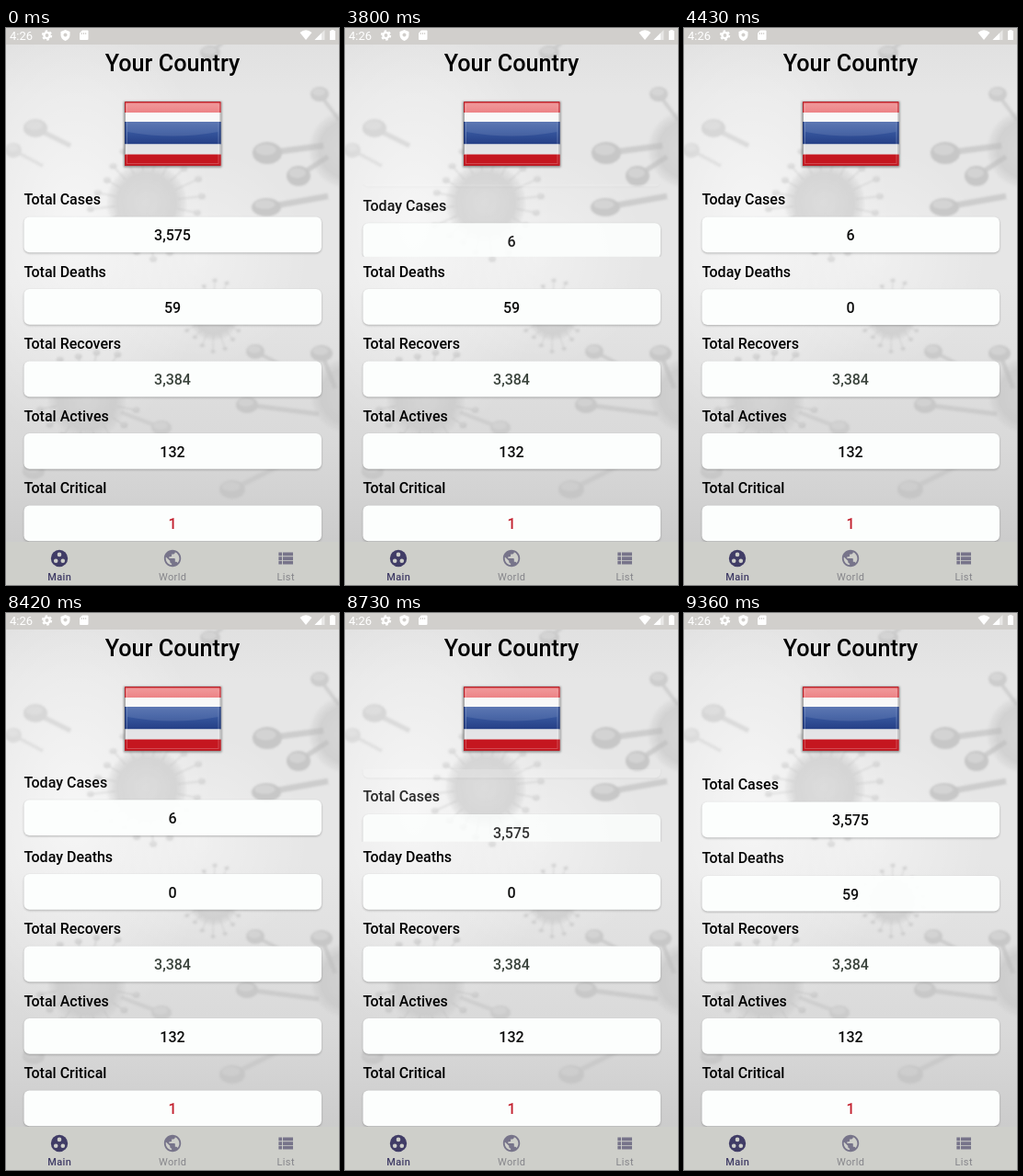
These frames come from a looping animation (362x606 px, 9.44 s). An HTML page:

```html
<!DOCTYPE html>
<html lang="en">
<head>
<meta charset="utf-8">
<title>Your Country</title>
<style>
  html, body { margin: 0; width: 100%; height: 100%; overflow: hidden; background: #ddd; }
  svg { display: block; width: 362px; height: 606px; font-family: Roboto, sans-serif; }
  .title { font-size: 25.2px; font-weight: 500; }
  .card text { font-size: 16px; font-weight: 500; }
  .mid { text-anchor: middle; }
  nav, .tab { font-size: 11px; letter-spacing: .4px; }
</style>
</head>
<body>
<svg viewBox="0 0 362 606">
  <defs>
    <linearGradient id="paper" x1="0" y1="0" x2="0" y2="1">
      <stop offset="0" stop-color="#dfdfdf"/>
      <stop offset=".12" stop-color="#e6e6e6"/>
      <stop offset=".45" stop-color="#e6e6e6"/>
      <stop offset=".75" stop-color="#d9d9d9"/>
      <stop offset="1" stop-color="#c6c6c6"/>
    </linearGradient>
    <radialGradient id="glow">
      <stop offset="0" stop-color="#fff" stop-opacity=".65"/>
      <stop offset="1" stop-color="#fff" stop-opacity="0"/>
    </radialGradient>
    <radialGradient id="cell">
      <stop offset="0" stop-color="#c9c9c9" stop-opacity=".5"/>
      <stop offset=".75" stop-color="#bdbdbd" stop-opacity=".5"/>
      <stop offset="1" stop-color="#c4c4c4" stop-opacity=".15"/>
    </radialGradient>
    <linearGradient id="flagRed" x1="0" y1="0" x2="0" y2="1">
      <stop offset="0" stop-color="#d8474c"/>
      <stop offset=".3" stop-color="#ee8a8c"/>
      <stop offset="1" stop-color="#ea7478"/>
    </linearGradient>
    <linearGradient id="flagBlue" x1="0" y1="0" x2="0" y2="1">
      <stop offset="0" stop-color="#4a68aa"/>
      <stop offset=".45" stop-color="#36569d"/>
      <stop offset="1" stop-color="#253f86"/>
    </linearGradient>
    <filter id="soft" x="-20%" y="-20%" width="140%" height="140%"><feGaussianBlur stdDeviation="1.3"/></filter>
    <filter id="shade" x="-10%" y="-20%" width="120%" height="150%"><feGaussianBlur stdDeviation="1"/></filter>
    <clipPath id="row0"><rect y="170" width="362" height="78.7"/></clipPath>
    <clipPath id="row1"><rect y="248.5" width="362" height="78.7"/></clipPath>
  </defs>

  <rect width="362" height="606" fill="url(#paper)"/>
  <ellipse cx="75" cy="215" rx="150" ry="240" fill="url(#glow)"/>
  <ellipse cx="210" cy="250" rx="120" ry="120" fill="url(#glow)" opacity=".6"/>
  <g id="germs" filter="url(#soft)"></g>

  <rect width="362" height="18" fill="#d1cfcc"/>
  <g fill="#fff">
    <text x="4" y="12.6" font-size="13">4:26</text>
    <circle cx="44.5" cy="8" r="3.1" fill="none" stroke="#fff" stroke-width="2.4"/>
    <circle cx="44.5" cy="8" r="4.8" fill="none" stroke="#fff" stroke-width="1.8" stroke-dasharray="2.5 2.527"/>
    <path d="M64.5 2l5 2.1v3.4c0 3-2 5.500-5 6.500c-3-1-5-3.500-5-6.500V4.100z"/>
    <circle cx="64.500" cy="7.500" r="2" fill="#d1cfcc"/>
    <path d="M83 2.500h5.500q1 0 1 1v8.500q0 1-1 1h-7.500q-1 0-1-1V5.500z"/>
    <path d="M82.300 5v2M84.500 5v2M86.700 5v2" stroke="#d1cfcc"/>
    <path d="M319.500 5q6.500-5.500 13 0l-6.500 8z"/>
    <path d="M346.500 2v11h-11z" opacity=".5"/>
    <path d="M343 5.500v7.500h-7.500z"/>
    <path d="M353.500 2h3v1h1.500v10h-6V3h1.500z"/>
  </g>

  <text class="title mid" x="181" y="47">Your Country</text>

  <rect x="128" y="80" width="106.500" height="71.500" fill="#444" opacity=".55" filter="url(#shade)"/>
  <g id="flag">
    <rect x="129" y="80" width="104.500" height="70" fill="#f7f7f7"/>
    <rect x="129" y="80" width="104.500" height="12" fill="url(#flagRed)"/>
    <rect x="129" y="102" width="104.500" height="24.500" fill="url(#flagBlue)"/>
    <rect x="129" y="126.500" width="104.500" height="11" fill="#e4e4e6"/>
    <rect x="129" y="137.500" width="104.500" height="12.500" fill="#c5161f"/>
    <path d="M132 113q49 9 98.500 0V83H132z" fill="#fff" opacity=".1"/>
    <rect x="131.500" y="82.500" width="99.500" height="65" fill="none" stroke="#fff" opacity=".22"/>
    <path d="M129.500 92V80.500H233V92M129.500 137.500V149.500H233V137.500" fill="none" stroke="#b5222a"/>
    <path d="M129.500 102v24.500M233 102v24.500" stroke="#22366f"/>
    <path d="M129.500 92v10M233 92v10M129.500 126.500v11M233 126.500v11" stroke="#aaa"/>
  </g>

  <g id="cards"></g>

  <rect y="559" width="362" height="47" fill="#cecfca"/>
  <g class="tab mid" fill="#403c66">
    <circle cx="58" cy="577" r="9.200"/>
    <g fill="#cecfca">
      <circle cx="58" cy="572.900" r="2.300"/><circle cx="54.200" cy="579.700" r="2.300"/><circle cx="61.800" cy="579.700" r="2.300"/>
    </g>
    <text x="58.200" y="601" font-weight="500">Main</text>
  </g>
  <g class="tab mid" fill="#77748a">
    <path transform="translate(170 566) scale(.92)" d="M12 2C6.480 2 2 6.480 2 12s4.480 10 10 10 10-4.480 10-10S17.520 2 12 2zm-1 17.930c-3.950-.490-7-3.850-7-7.930 0-.620.080-1.210.210-1.790L9 15v1c0 1.100.900 2 2 2zm6.900-2.540c-.260-.810-1-1.390-1.900-1.390h-1v-3c0-.550-.450-1-1-1H8v-2h2c.550 0 1-.450 1-1V7h2c1.100 0 2-.900 2-2v-.410c2.930 1.190 5 4.060 5 7.410 0 2.080-.800 3.970-2.100 5.390z"/>
    <path transform="translate(292.700 566) scale(.92)" d="M4 14h4v-4H4zm0 5h4v-4H4zM4 9h4V5H4zm5 5h12v-4H9zm0 5h12v-4H9zM9 5v4h12V5z"/>
    <g fill="#85858a"><text x="181.200" y="601">World</text><text x="304.200" y="601">List</text></g>
  </g>
</svg>

<script>
const LOOP = 9440, PITCH = 78.5, TOP = 170, SLIDE = 500;
// Starts of runs of 80 ms ticks; the picture holds between ticks.
const TICK = 80, RUNS = [-40, 4190, 8420, 8570, 9120];
const $ = id => document.getElementById(id);

function add(parent, tag, attrs = {}, text = '') {
  const el = document.createElementNS('http://www.w3.org/2000/svg', tag);
  for (const key in attrs) el.setAttribute(key, attrs[key]);
  el.textContent = text;
  return parent.appendChild(el);
}

function knob(x, y, rx, ry, toX, toY, alpha = .6) {
  const g = add($('germs'), 'g', { opacity: alpha });
  add(g, 'path', { d: `M${x} ${y}L${toX} ${toY}`, stroke: '#bcbcbc', 'stroke-width': rx * .4 });
  add(g, 'ellipse', { cx: x, cy: y, rx, ry, fill: '#b3b3b3' });
  add(g, 'ellipse', { cx: x - rx * .1, cy: y - ry * .3, rx: rx * .7, ry: ry * .5, fill: '#c6c6c6' });
}

function germ(x, y, r, spikes, alpha) {
  add($('germs'), 'circle', { cx: x, cy: y, r, fill: 'url(#cell)' });
  for (let i = 0; i < spikes; i++) {
    const a = i * 2 * Math.PI / spikes + .2, reach = r * (1.3 + .15 * Math.sin(i * 5));
    const size = r * .09;
    knob(x + reach * Math.cos(a), y + reach * Math.sin(a), size, size * .8,
      x + r * .8 * Math.cos(a), y + r * .8 * Math.sin(a), alpha);
  }
}

germ(153, 190, 43, 20, .4);
germ(226, 313, 27, 18, .5);
germ(88, 405, 42, 16, .5);
germ(372, 132, 42, 0, 0);
germ(372, 400, 40, 0, 0);
knob(284, 136, 16, 12, 345, 128);
knob(318, 161, 13, 11, 350, 140);
knob(283, 195, 16, 10, 350, 183);
knob(222, 27, 11, 8, 252, 2, .5);
knob(341, 72, 10, 8, 362, 100, .5);
knob(32, 109, 13, 10, 70, 128, .4);
knob(8, 133, 9, 8, 40, 150, .3);
knob(271, 352, 10, 8, 310, 372, .5);
knob(343, 354, 12, 9, 358, 392, .55);
knob(262, 410, 12, 9, 340, 420, .5);
knob(169, 435, 11, 8, 125, 418, .4);
knob(30, 482, 12, 9, 62, 440, .4);
knob(246, 502, 14, 10, 310, 470, .4);

function card(parent, row, label, value, color = '#0b0b0b') {
  const g = add(parent, 'g', { class: 'card' }), y = TOP + row * PITCH;
  const box = { x: 19.5, y: y + 35.5, width: 323.5, height: 38.7, rx: 6 };
  add(g, 'text', { x: 19.4, y: y + 22 }, label);
  add(g, 'rect', { ...box, y: box.y + 1, fill: '#555', opacity: .4, filter: 'url(#shade)' });
  add(g, 'rect', { ...box, fill: '#fcfefd' });
  add(g, 'text', { x: 181, y: y + 61.2, class: 'mid', fill: color }, value);
  return g;
}

function slidingRow(row, label, total, today, starts) {
  const g = add($('cards'), 'g', { 'clip-path': `url(#row${row})` });
  return { starts, faces: [card(g, row, 'Total ' + label, total), card(g, row, 'Today ' + label, today)] };
}

const rows = [
  slidingRow(0, 'Cases', '3,575', '6', [3395, 8366]),
  slidingRow(1, 'Deaths', '59', '0', [3952, 8910]),
];
card($('cards'), 2, 'Total Recovers', '3,384', '#3b443d');
card($('cards'), 3, 'Total Actives', '132');
card($('cards'), 4, 'Total Critical', '1', '#c3202e');

function ease(x) {
  return (1 - Math.cos(Math.PI * Math.min(1, Math.max(0, x)))) / 2;
}

function place(face, offset) {
  face.setAttribute('transform', `translate(0 ${(offset * PITCH).toFixed(2)})`);
  face.setAttribute('opacity', Math.max(0, 1 - Math.abs(offset)).toFixed(3));
}

function draw(time) {
  const run = RUNS.filter(start => start <= time).pop();
  const t = run + TICK * Math.floor((time - run) / TICK);
  for (const { starts, faces: [total, today] } of rows) {
    const [there, back] = starts.map(start => ease((t - start) / SLIDE));
    place(total, back > 0 ? 1 - back : -there);
    place(today, back > 0 ? -back : 1 - there);
  }
}

const begin = performance.now();
function frame() {
  draw((performance.now() - begin) % LOOP);
  requestAnimationFrame(frame);
}
frame();
</script>
</body>
</html>
```
